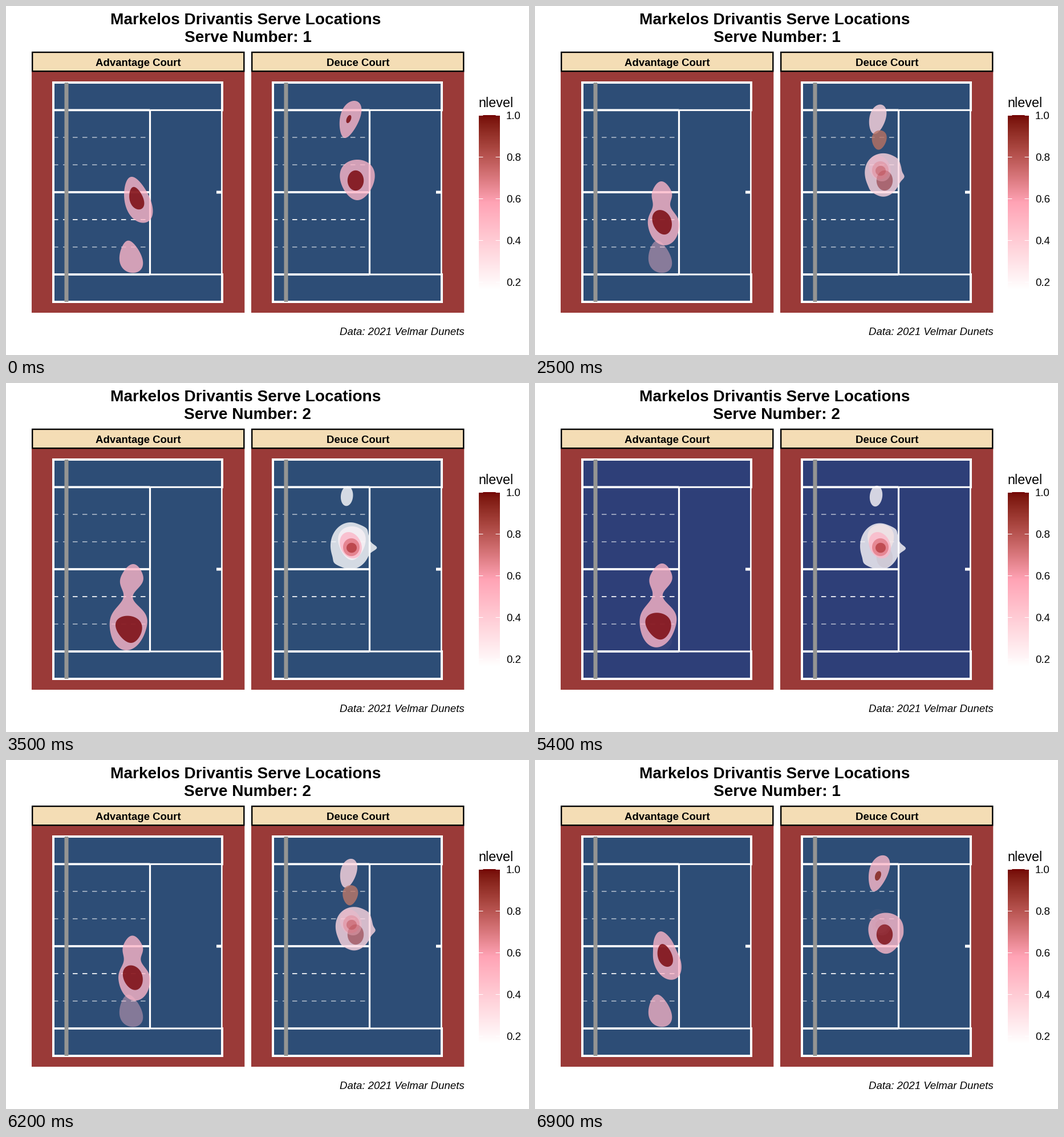
Write a matplotlib script that moves like this. It is 917 by 611 pixels and loops after 7 s.

```python
import matplotlib.pyplot as plt
import numpy as np
from matplotlib.animation import FuncAnimation
from matplotlib.patches import Polygon, Rectangle

W, H, DPI = 917, 611, 64
PX = 72 / DPI  # one pixel in points
FRAMES, INTERVAL = 70, 100
SHIFT = 385    # distance between the two panels

WHITE, PINK, RED = (255, 255, 255), (252, 182, 200), (117, 0, 4)
OFF_WHITE, ROSE, BRICK = (250, 243, 246), (225, 118, 130), (180, 57, 61)
COURT, COURT_VIOLET = (45, 77, 118), (46, 63, 120)
CLAY, WHEAT, NET = (154, 58, 56), (244, 221, 181), (149, 149, 147)
ALPHA = 0.8
THETA = np.linspace(0, 2 * np.pi, 180, endpoint=False)
XYZ = np.array([[0.4124, 0.3576, 0.1805], [0.2126, 0.7152, 0.0722],
                [0.0193, 0.1192, 0.9505]])
XYZ /= XYZ.sum(1, keepdims=True)


def rgb(color):
    return tuple(np.asarray(color) / 255)


def mix_colors(a, b, t):
    """Blend two colours evenly to the eye, as in Lab space."""
    lab_a, lab_b = (np.cbrt(XYZ @ np.power(rgb(c), 2.2)) for c in (a, b))
    linear = np.linalg.solve(XYZ, (lab_a + (lab_b - lab_a) * t) ** 3)
    return np.clip(linear, 0, 1) ** (1 / 2.2)


fig = plt.figure(figsize=(W / DPI, H / DPI), dpi=DPI, facecolor="white")
ax = fig.add_axes([0, 0, 1, 1])
ax.axis("off")


def box(x0, y0, x1, y1, fill, edge=None, lw=0, z=1):
    return ax.add_patch(Rectangle(
        (x0, y0), x1 - x0, y1 - y0, lw=lw * PX, zorder=z, snap=False,
        facecolor=rgb(fill), edgecolor=rgb(edge) if edge else "none"))


def line(x0, y0, x1, y1, lw, color=WHITE, z=2):
    ax.plot([x0, x1], [y0, y1], color=rgb(color), lw=lw * PX,
            solid_capstyle="butt", zorder=z, snap=False)


def label(x, y, text, size, ha="left", **style):
    return ax.text(x, y, text, fontsize=size * PX, ha=ha, va="baseline",
                   family="Liberation Sans", color="black", **style)


def draw_panel(dx, name):
    box(45 + dx, 115, 418.3 + dx, 537, CLAY)
    box(46.2 + dx, 81, 417.3 + dx, 114.2, WHEAT, (0, 0, 0), 2.4, z=2)
    label(231.8 + dx, 104.7, name, 18.67, "center", weight="bold")
    left, right, service = 83 + dx, 379 + dx, 252.5 + dx
    court = box(left, 134, right, 518, COURT)
    for outer, inner in ((134, 182.3), (518, 470)):
        away = np.sign(inner - outer) * 2
        line(left - 2, outer, right + 2, outer, 4)
        line(right, outer, right, inner + away, 4)
        line(left, inner, service, inner, 3.8)
        line(service, inner, right, inner, 3)
    line(left, 134, left, 518, 4)
    line(right - 0.6, 182, right - 0.6, 470, 2.6)
    line(service, 182, service, 470, 3.2)
    line(left, 326, service, 326, 3.8)
    line(369 + dx, 326, right, 326, 5)
    for y in (230, 278, 374, 422):
        for x in np.arange(left, service - 4, 17):
            line(x, y, x + 8.5, y, 1.7 if y == 374 else 1)
    line(106 + dx, 134, 106 + dx, 518, 7, NET, z=3)
    return court


def draw_legend():
    label(828.5, 177, "nlevel", 23.33)
    middle = (255, 163, 181)
    ramp = np.linspace(0, 2, 305)
    bar = [mix_colors(RED, middle, s) if s < 1 else mix_colors(middle, WHITE, s - 1)
           for s in ramp]
    ax.imshow(np.array(bar)[:, None], extent=(829, 866, 496, 191), aspect="auto", zorder=1)
    for i in range(5):
        y = 191.5 + 73 * i
        line(829, y, 836.4, y, 1)
        line(858.6, y, 866, y, 1)
        label(877, y + 6.6, f"{1 - 0.2 * i:.1f}", 18.67)


def contour(cx, cy, rx, ry, lean=0, egg=0, dents=()):
    """Ellipse run clockwise from the top: lean shifts its top to the right,
    egg widens its top, and each dent (degrees, depth, spread) narrows one side."""
    up = np.cos(THETA)
    width = rx * np.sin(THETA) * (1 + egg * up)
    for angle, depth, spread in dents:
        gap = (np.degrees(THETA) - angle + 180) % 360 - 180
        width = width * (1 - depth * np.exp(-(gap / spread) ** 2))
    return np.column_stack([cx + lean * up + width, cy - ry * up])


class Blob:
    """Density region that morphs, or fades when it exists on one side only."""

    def __init__(self, start, start_color, end, end_color):
        self.alphas = ALPHA * (start is not None), ALPHA * (end is not None)
        self.curves = (end if start is None else start, start if end is None else end)
        self.colors = start_color or end_color, end_color or start_color
        self.patch = ax.add_patch(Polygon(self.curves[0], lw=0, zorder=5))

    def update(self, t):
        def mix(pair):
            return pair[0] * (1 - t) + pair[1] * t
        self.patch.set_xy(mix(self.curves))
        self.patch.set_facecolor((*mix_colors(*self.colors, t), mix(self.alphas)))


def fade_out(curve, color):
    return Blob(curve, color, None, None)


def fade_in(curve, color):
    return Blob(None, None, curve, color)


courts = [draw_panel(0, "Advantage Court"), draw_panel(SHIFT, "Deuce Court")]
draw_legend()
label(420, 32.3, "Markelos Drivantis Serve Locations", 28, "center", weight="bold")
serve_text = label(424, 62.6, "", 28, "center", weight="bold")
label(803.5, 576, "Data: 2021 Velmar Dunets", 18.67, "right", style="italic")

waist = [(76, 0.88, 18), (-76, 0.6, 18)]
bulges = [(95, -0.33, 10), (40, -0.2, 15), (-140, -0.2, 15)]

# Drawing order is stacking order.
blobs = [
    fade_out(contour(218.5, 439, 19.6, 28.3, lean=-4, egg=-0.3), PINK),
    Blob(contour(230.5, 339.3, 22.9, 40.3, lean=-10, egg=-0.22), PINK,
         contour(217, 392.5, 33.5, 75.5, lean=6, egg=-0.2, dents=waist), PINK),
    Blob(contour(228.5, 336.5, 12.2, 19.7, lean=-4.5, egg=-0.2), RED,
         contour(216, 431.3, 22.5, 23.7, lean=-3, egg=0.25), RED),
    Blob(contour(602.5, 198.5, 17.3, 32.5, lean=8, egg=0.25), PINK,
         contour(597.7, 198, 10.7, 17.3, lean=1), WHITE),
    Blob(contour(616, 304.5, 30, 35.5, egg=0.22), PINK,
         contour(604, 285, 35, 41, dents=bulges), WHITE),
    Blob(contour(601, 198, 4, 7, lean=2), RED,
         contour(606.5, 280.5, 23.6, 29.5, egg=0.25), OFF_WHITE),
    fade_out(contour(613, 305.5, 14.2, 17.7), RED),
    fade_in(contour(604.5, 284, 18.8, 23, lean=-4), PINK),
    fade_in(contour(605.5, 287.5, 14.5, 15.6), ROSE),
    fade_in(contour(606, 288.5, 9, 8.7), BRICK),
]

ax.set_xlim(0, W)
ax.set_ylim(H, 0)


def progress(k):
    """0 shows the first serve, 1 the second."""
    if k < 54:
        return np.clip((k - 17) / 18, 0, 1)
    return (FRAMES - k) / 17


def draw(k):
    t = progress(k)
    for blob in blobs:
        blob.update(t)
    for court in courts:
        court.set_facecolor(rgb(COURT_VIOLET if 0.9 < t < 1 else COURT))
    serve_text.set_text(f"Serve Number: {2 if 27 <= k < 63 else 1}")
    return []


anim = FuncAnimation(fig, draw, frames=FRAMES, interval=INTERVAL, init_func=lambda: [],
                     repeat=True, repeat_delay=0)
plt.show()
```
